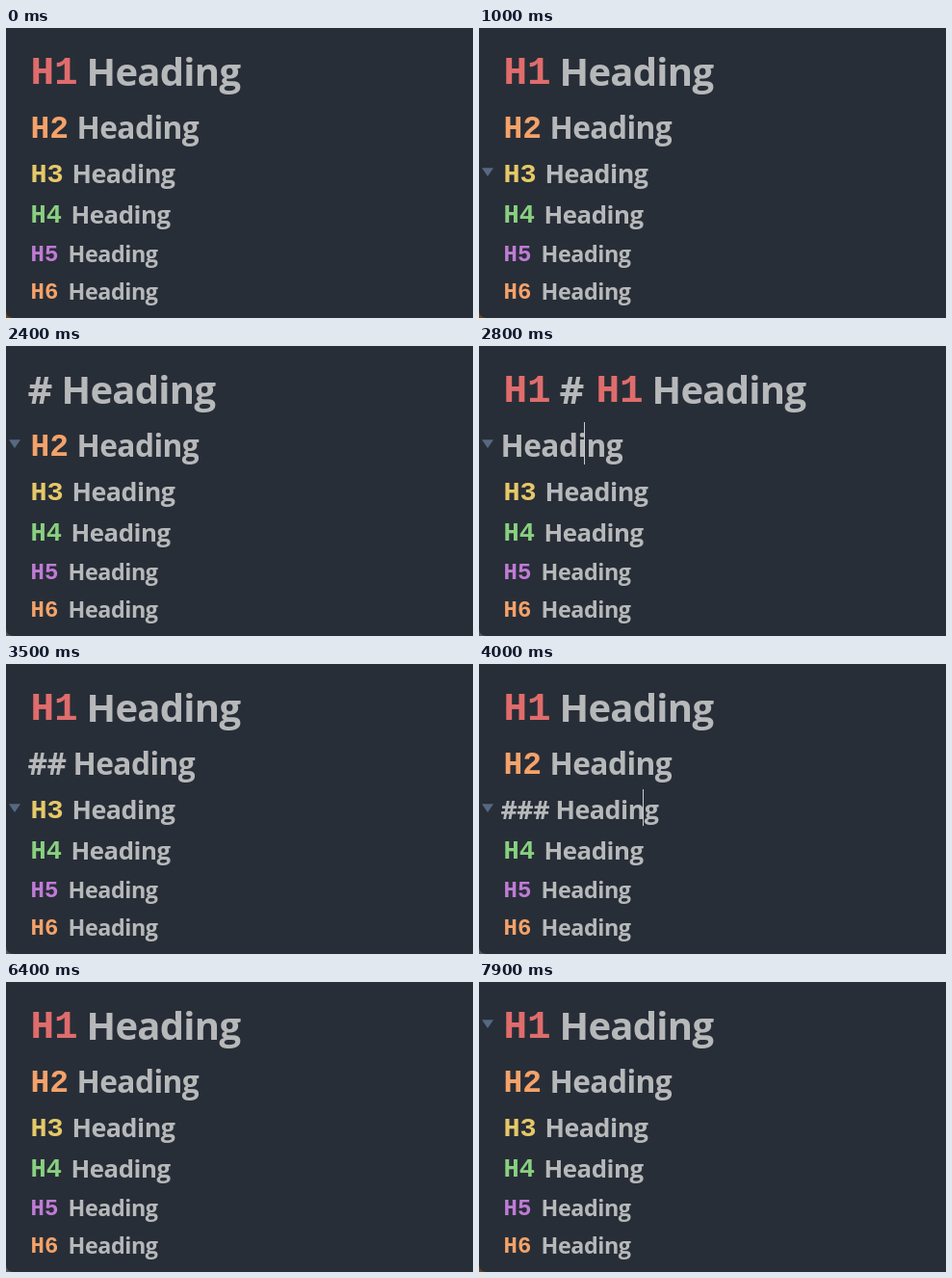
An HTML page with a canvas that plays this animation: 485 by 301 pixels, repeating every 8 s.

```html
<!DOCTYPE html>
<html lang="en">
<head>
<meta charset="utf-8">
<title>Heading levels</title>
<style>
  html, body { margin: 0; width: 100%; height: 100%; overflow: hidden; background: #282e37; }
  canvas { display: block; }
</style>
</head>
<body>
<canvas id="stage" width="485" height="301"></canvas>
<script>
const ctx = document.getElementById('stage').getContext('2d');
const LOOP = 8000;
const LEFT = 22.5;
const TEXT_COLOR = '#b6b8ba';

// tagWidth and hashWidth are the room a tag or a run of # takes before the text.
const rows = [
  { size: 40,   weight: 700, tagSize: 41,   base: 59.5,  arrowY: 39,  color: '#e06c6c', tagWidth: 61, hashWidth: 35, caret: [135, 15, 56] },
  { size: 31.7, weight: 650, tagSize: 33,   base: 114.5, arrowY: 97,  color: '#f4a26a', tagWidth: 51, hashWidth: 47, caret: [109, 79, 44] },
  { size: 26.8, weight: 650, tagSize: 28.5, base: 160.5, arrowY: 145, color: '#e5c868', tagWidth: 46, hashWidth: 57, caret: [113, 130, 38] },
  { size: 25.8, weight: 650, tagSize: 27,   base: 203,   arrowY: 189, color: '#88d080', tagWidth: 45 },
  { size: 23.3, weight: 650, tagSize: 24,   base: 243,   arrowY: 230, color: '#c07bd6', tagWidth: 42 },
  { size: 23.3, weight: 650, tagSize: 24,   base: 282,   arrowY: 269, color: '#f4a26a', tagWidth: 42 },
];

// What stands in a row, left to right: T = tag, # = hash marks; the text follows.
// Each step: start time, contents of the first three rows, row with the arrow, row with the caret.
const TAGGED = ['T', 'T', 'T'];
const steps = [
  [0, TAGGED, 0, 0],
  [200, TAGGED, 3, 0],
  [300, TAGGED, 4, 0],
  [400, TAGGED, 5, 0],
  [500, TAGGED, 6, 0],
  [800, TAGGED, 5, 0],
  [900, TAGGED, 4, 0],
  [1000, TAGGED, 3, 0],
  [1100, TAGGED, 2, 0],
  [1200, TAGGED, 1, 0],
  [1800, ['', 'T', 'T'], 1, 1],
  [1900, ['#', 'T', 'T'], 1, 1],
  [2300, ['#', 'T', 'T'], 1, 0],
  [2400, ['#', 'T', 'T'], 2, 0],
  [2800, ['T#T', '', 'T'], 2, 2],
  [2900, ['T', '#', 'T'], 2, 2],
  [3300, ['T', '#', 'T'], 2, 0],
  [3500, ['T', '#', 'T'], 3, 0],
  [3800, ['T', 'T#T', ''], 3, 3],
  [4000, ['T', 'T', '#'], 3, 3],
  [4300, ['T', 'T', '#'], 3, 0],
  [4800, ['T', 'T', '#'], 5, 3],
  [4900, ['T', 'T', '#'], 0, 3],
  [5100, ['T', 'T', '#'], 0, 0],
  [6400, TAGGED, 0, 0],
  [7900, TAGGED, 1, 0],
];

function write(text, x, y, font, color, spacing = 0) {
  ctx.font = font;
  ctx.letterSpacing = `${spacing}px`;
  ctx.fillStyle = color;
  ctx.fillText(text, x, y);
}

function drawRow(row, level, parts, hasCaret) {
  const textFont = `${row.weight} ${row.size}px "Open Sans", "Noto Sans", sans-serif`;
  const tagFont = `700 ${row.tagSize}px "Liberation Mono", monospace`;
  const tracking = -0.018 * row.size;
  let x = LEFT;
  for (const part of parts) {
    if (part === 'T') {
      write('H' + level, x + 3, row.base - 0.025 * row.tagSize, tagFont, row.color);
      x += row.tagWidth;
    } else {
      write('#'.repeat(level), x, row.base, textFont, TEXT_COLOR, tracking);
      x += row.hashWidth;
    }
  }
  write('Heading', x, row.base, textFont, TEXT_COLOR, tracking);
  if (hasCaret) {
    const [caretX, top, height] = row.caret;
    ctx.fillStyle = '#c9cdd1';
    ctx.fillRect(caretX + x - LEFT, top, 1, height);
  }
}

function drawArrow(y) {
  ctx.fillStyle = '#566982';
  ctx.beginPath();
  ctx.moveTo(3, y + 0.3);
  ctx.lineTo(15, y + 0.3);
  ctx.lineTo(9, y + 9);
  ctx.fill();
}

function drawCorner(color) {
  ctx.fillStyle = color;
  ctx.beginPath();
  ctx.moveTo(0, 294);
  ctx.quadraticCurveTo(0.5, 300.5, 8, 301);
  ctx.lineTo(0, 301);
  ctx.fill();
}

function draw(time) {
  const [, parts, arrow, caret] = steps.findLast(([start]) => start <= time);
  ctx.fillStyle = '#282e37';
  ctx.fillRect(0, 0, 485, 301);
  drawCorner(time < 1800 || time >= 7600 ? '#6b431a' : '#50555d');
  rows.forEach((row, i) => drawRow(row, i + 1, parts[i] ?? 'T', caret === i + 1));
  if (arrow) drawArrow(rows[arrow - 1].arrowY);
}

const began = performance.now();
function frame() {
  draw((performance.now() - began) % LOOP);
  requestAnimationFrame(frame);
}
frame();
</script>
</body>
</html>
```
